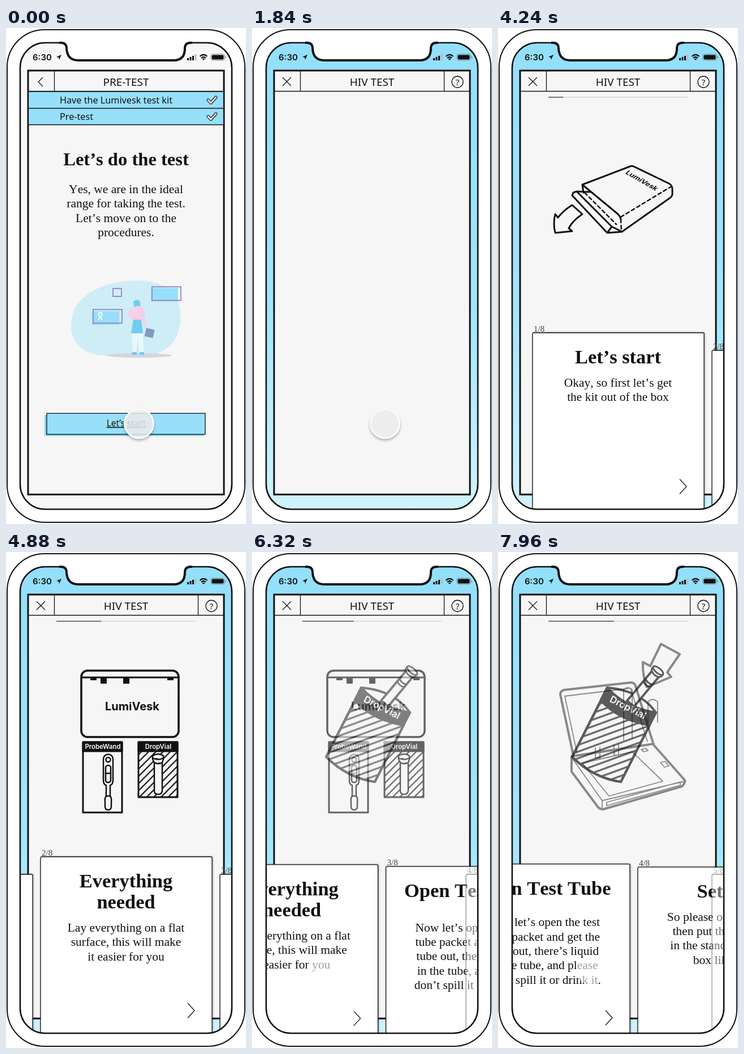
Write an HTML page that moves like this. It is 424 by 874 pixels and loops after 8 s.

```html
<!DOCTYPE html>
<html lang="en">
<head>
<meta charset="utf-8">
<title>Test guide</title>
<style>
  html, body { margin: 0; width: 100%; height: 100%; overflow: hidden; background: #fff; }
  svg { display: block; width: 100vw; height: 100vh; }
  text { fill: #111; }
  .title { font: bold 34.4px "Liberation Serif", serif; font-kerning: none; text-anchor: middle; }
  .home-title { font-size: 32.6px; }
  .body { font: 21.5px "Liberation Serif", serif; font-kerning: none; text-anchor: middle; }
  .count { font: 15px "Liberation Serif", serif; fill: #444; }
  .ui { font: 16.2px "Noto Sans", sans-serif; }
  .head { font-size: 18.9px; text-anchor: middle; }
  .brand { font: 700 20px Inter, sans-serif; text-anchor: middle; }
  .tag { font: 600 11.3px Inter, sans-serif; text-anchor: middle; fill: #fff; }
  .line { fill: none; stroke: #111; stroke-width: 1.3; }
  .art { fill: none; stroke: #111; stroke-width: 3; stroke-linejoin: round; stroke-linecap: round; }
  .bold { stroke-width: 4; }
  .art text { stroke: none; }
  .paper { fill: #f6f6f6; }
  .ink { fill: #111; }
</style>
</head>
<body>
<svg viewBox="0 0 424 874" preserveAspectRatio="none">
  <defs>
    <path id="screen" d="M25 70A44 44 0 0 1 69 26H97Q107 26 107 36Q108 57 128 57H296Q316 57 316 36Q316 26 326 26H355A44 44 0 0 1 399 70V804A44 44 0 0 1 355 848H69A44 44 0 0 1 25 804Z"/>
    <clipPath id="clip"><use href="#screen"/></clipPath>
    <linearGradient id="sky" x2="0" y2="1">
      <stop offset="0" stop-color="#92dffa"/>
      <stop offset=".55" stop-color="#a0e5fb"/>
      <stop offset="1" stop-color="#d3f4fd"/>
    </linearGradient>
    <pattern id="hatch" width="9" height="9" patternUnits="userSpaceOnUse" patternTransform="rotate(-45)">
      <path d="M0 4H9" stroke="#111" stroke-width="2.2"/>
    </pattern>
    <pattern id="stripes" width="11" height="11" patternUnits="userSpaceOnUse" patternTransform="rotate(-20)">
      <path d="M0 5H11" stroke="#111" stroke-width="3"/>
    </pattern>
    <filter id="shadow" x="-30%" y="-30%" width="160%" height="170%">
      <feDropShadow dx="0" dy="3" stdDeviation="2" flood-opacity=".3"/>
    </filter>
    <filter id="cardShadow" x="-5%" y="-5%" width="110%" height="110%">
      <feDropShadow dx="1" dy="0" stdDeviation="1.5" flood-opacity=".35"/>
    </filter>
    <g id="frame">
      <rect x="39" y="75" width="346" height="747" fill="#f6f6f6" stroke="#111" stroke-width="3"/>
      <path class="line" d="M40 111.5H384M85.5 76V111"/>
    </g>
  </defs>

  <rect x="2" y="3" width="420" height="868" rx="66" fill="#fff" stroke="#111" stroke-width="2"/>

  <g clip-path="url(#clip)">
    <rect width="424" height="874" fill="url(#sky)"/>
    <use href="#frame"/>
    <path class="line" d="M54 87L69 102M69 87L54 102M339.5 76V111"/>
    <text class="ui head" x="212" y="102">HIV TEST</text>
    <circle class="line" cx="363" cy="95" r="10"/>
    <text class="ui" x="363" y="100.5" text-anchor="middle" style="font-size:15px">?</text>

    <g id="progress">
      <path d="M89 122H335" stroke="#ddd" stroke-width="2"/>
      <path id="bar" stroke="#777" stroke-width="2"/>
    </g>

    <g id="arts">
      <g class="art">
        <path d="M151 290L149 276L233 244Q237 242 242 245L302 274Q308 277 308 284V292Q308 297 303 300L219 359L193 361L131 295L133 290L139 288L201 350L219 359M149 276L212 328Q216 332 217 337M139 288L164 289M201 350L193 361"/>
        <path d="M217 333L305 280M153 290L209 346M217 337L218 357" stroke-dasharray="6 5" stroke-width="2.5"/>
        <path d="M131 312L149 328Q131 340 125 353L131 358L101 361Q97 344 101 328L106 334Q116 321 131 312Z"/>
        <text class="brand" style="font-size:13px;text-anchor:start" transform="matrix(.87 .5 -.7 .6 224 256)">LumiVesk</text>
      </g>
      <g class="art">
        <rect x="133" y="209" width="172" height="117" rx="11" stroke-width="3.5"/>
        <path d="M133 221H305"/>
        <path class="ink" stroke="none" d="M149 221h11v5h-11zM167 221h11v11h-11zM207 221h11v11h-11zM285 221h11v5h-11z"/>
        <text class="brand" x="223" y="279">LumiVesk</text>
        <rect x="136" y="335" width="69" height="124"/>
        <path class="ink" d="M136 335h69v16h-69z"/>
        <text class="tag" x="171" y="347">ProbeWand</text>
        <g stroke-width="2.5">
          <path d="M172 365a8.5 8.5 0 0 1 17 0V402Q189 410 184 411V430Q187 434 186 440V449a5.5 5.5 0 0 1-11 0V440Q174 434 177 430V411Q172 410 172 402Z"/>
          <circle cx="180.5" cy="366" r="4"/>
          <rect x="176" y="376" width="9" height="30" rx="4"/>
          <path d="M176 390H185M177 430H184"/>
        </g>
        <rect x="234" y="335" width="69" height="97" fill="url(#hatch)"/>
        <path class="ink" d="M234 335h69v16h-69z"/>
        <text class="tag" x="269" y="347">DropVial</text>
        <path class="paper" stroke-width="2.5" d="M259 359Q269 353 278 359V365L276 371V421Q275 427 269 427Q262 427 262 421V371L259 365ZM259 363Q269 368 278 363M262 371Q269 375 276 371"/>
      </g>
      <g class="art bold">
        <path class="paper" d="M193 239Q252 244 279 283Q220 280 193 239Z"/>
        <g class="paper" transform="translate(283 209) rotate(40)">
          <path d="M-8 8V76H8V8Z"/>
          <path d="M-11 0V4Q-10 9 0 10Q10 9 11 4V0ZM-8 25Q0 30 8 25M-8 31Q0 36 8 31" stroke-width="3"/>
          <ellipse rx="11" ry="4.5" stroke-width="3"/>
        </g>
        <path class="paper" d="M193 239Q225 275 279 283L217 405Q168 398 131 361Z"/>
        <path fill="url(#stripes)" d="M182 262Q214 297 268 305L217 405Q168 398 131 361Z"/>
        <path class="ink" d="M193 239Q225 275 279 283L268 303Q214 297 182 260Z"/>
        <text class="tag" style="font-size:17px" transform="translate(227 279) rotate(27)">DropVial</text>
      </g>
      <g class="art bold">
        <path d="M133 358L110 251Q110 245 117 243L235 230Q241 230 243 236L275 340L330 402Q331 407 325 413L187 453Q181 454 177 450L130 387V360L275 338"/>
        <g stroke-width="1.8">
          <path d="M139 352L118 254L234 240L264 334M133 366L184 438L330 404M184 438V452M149 372L237 352L291 404L196 430ZM192 441V447L322 411V405ZM253 348l8-2 4 4-8 2zM287 371l8-2 7 8-8 2z"/>
          <path d="M222 331V242q7-6 15 0V328M265 310V264q8-8 17 0V300M172 345v18h8v-19M205 340v18h8v-19"/>
        </g>
        <path d="M288 162L321 180L299 212L306 220L263 238Q255 218 256 194L269 201Z"/>
      </g>
    </g>

    <g id="cards"></g>

    <g id="home">
      <rect width="424" height="874" fill="#f7f7f7"/>
      <use href="#frame"/>
      <path class="line" d="M65 87L57 95L65 103"/>
      <text class="ui head" x="212" y="102">PRE-TEST</text>
      <path fill="#97dffa" d="M40.5 112H383.5V171H40.5Z"/>
      <path class="line" d="M40 112H384M40 141.5H384M40 170.5H384"/>
      <text class="ui" x="95" y="133">Have the Lumivesk test kit</text>
      <text class="ui" x="95" y="162">Pre-test</text>
      <g fill="none" stroke-linecap="round" stroke-linejoin="round">
        <path d="M357 127L362 132L371 122M357 156L362 161L371 151" stroke="#111" stroke-width="5"/>
        <path d="M357 127L362 132L371 122M357 156L362 161L371 151" stroke="#fff" stroke-width="2.6"/>
      </g>
      <g id="intro"></g>

      <path fill="#cfedf6" d="M115 528C114 490 136 468 172 455C205 443 250 440 282 456C304 468 312 498 307 524C303 552 283 574 250 577H180C140 578 117 558 115 528Z"/>
      <ellipse cx="235" cy="577" rx="58" ry="4" fill="#d3d6df"/>
      <path fill="#97dffa" d="M256 458h48v24h-48zM152 499h48v24h-48z"/>
      <path fill="none" stroke="#988fcb" stroke-width="2" d="M189 459h15v14h-15zM258 456h51v24h-51zM154 496h51v24h-51z"/>
      <path fill="none" stroke="#fff" stroke-width="2" d="M163 514L169 506A3 3 0 1 0 164 506L170 514"/>
      <path fill="#e9f9fd" d="M222 536H242L243 571H236L233 545L230 571H224Z"/>
      <path fill="#70cdee" d="M225 482Q231 476 237 482L238 493L226 492ZM225 513H239L242 538H221ZM223 571H231V576H222ZM236 571H244V576H236Z"/>
      <path fill="#f4d0ea" d="M225 492Q235 487 243 492L246 512L250 530L246 531L240 514H224L213 505Z"/>
      <rect x="246" y="530" width="15" height="15" fill="#7f9cbc" transform="rotate(12 254 538)"/>

      <rect x="68" y="682" width="282" height="37" fill="#83d5f3"/>
      <rect x="72" y="679" width="280" height="37" fill="#98e0fa" stroke="#111" stroke-width="1.3"/>
      <text class="ui" x="212.5" y="702" text-anchor="middle" text-decoration="underline" style="font-size:15.4px">Let’s start</text>
    </g>

    <circle id="tap" cx="235" cy="697" r="25.5" fill="#f2f2f2" fill-opacity=".8" stroke="#fafafa" stroke-width="3" filter="url(#shadow)"/>
    <circle id="swipe" cy="737" r="26" fill="#fff"/>
  </g>

  <use href="#screen" fill="none" stroke="#111" stroke-width="2.6"/>
  <path d="M94 26H97Q107 26 107 36Q108 57 128 57H296Q316 57 316 36Q316 26 326 26H329" fill="none" stroke="#111" stroke-width="4"/>

  <text x="47" y="57" style="font:600 15px Inter,sans-serif">6:30</text>
  <path class="ink" d="M89 51L98 47L94 56L93 52Z"/>
  <path class="ink" d="M320 53h3v4h-3zM324.500 51h3v6h-3zM329 49h3v8h-3z"/>
  <path fill="#bbb" d="M333.500 46h3v11h-3z"/>
  <path fill="none" stroke="#111" stroke-width="2.2" d="M342.500 50Q349 44 355.500 50M345 53Q349 49.500 353 53"/>
  <path class="ink" d="M346.500 54.500Q349 53 351.500 54.500L349 57Z"/>
  <rect x="362" y="46" width="24" height="11" rx="3" fill="none" stroke="#888"/>
  <rect x="363.500" y="47.500" width="21" height="8" rx="2" class="ink"/>
  <path d="M388 50V53" stroke="#888" stroke-width="1.5"/>
</svg>

<script>
const LOOP = 8000;
const CARD_STEP = 317;
const SWIPE_MS = 500;
const swipes = [
  { start: 4250, touchX: 280 },
  { start: 6089, touchX: 264 },
  { start: 7740, touchX: 295 }
];
const barLengths = [26.3, 79, 105, 131];
// bodyDrop: how much lower the body text sits while the card is at the side.
const steps = [
  { title: ["Let’s start"], body: ["Okay, so first let’s get", "the kit out of the box"] },
  { title: ["Everything", "needed"], body: ["Lay everything on a flat", "surface, this will make", "it easier for you"] },
  { title: ["Open Test Tube"], bodyDrop: 36, body: ["Now let’s open the test", "tube packet and get the", "tube out, there’s liquid", "in the tube, and please", "don’t spill it or drink it."] },
  { title: ["Set up"], body: ["So please open the box", "then put the test tube", "in the stand inside the", "box like this"] },
  { title: ["Wait"], body: ["Leave the tube there"] }
];

const $ = id => document.getElementById(id);
const clamp = (v, lo = 0, hi = 1) => Math.min(hi, Math.max(lo, v));
const ramp = (t, start, length) => clamp((t - start) / length);
const ease = p => p * p * (3 - 2 * p);

const textLines = (lines, cls, x, y, gap) => lines.map((line, i) =>
  `<text class="${cls}" x="${x}" y="${y + i * gap}">${line}</text>`).join("");

$("intro").innerHTML = textLines(["Let’s do the test"], "title home-title", 212, 242, 0) +
  textLines(["Yes, we are in the ideal", "range for taking the test.", "Let’s move on to the", "procedures."], "body", 212, 291, 25.4);

// Each card is drawn with its top left corner at the origin.
$("cards").innerHTML = steps.map(({ title, body }, i) => `<g>
  <text class="count" x="2" y="-2">${i + 1}/8</text>
  <rect width="303" height="360" rx="2" fill="#fff" stroke="#111" stroke-width="1.3" filter="url(#cardShadow)"/>
  ${textLines(title, "title", 151, 54, 37)}
  <g class="copy">${textLines(body, "body", 151, 57 + title.length * 37.5, 25.4)}</g>
  <path class="line" d="M260 258L272 271L260 284"/>
</g>`).join("");

const cards = [...$("cards").children];
const copies = cards.map(card => card.querySelector(".copy"));
const arts = [...$("arts").children];

function draw(t) {
  $("home").style.opacity = 1 - ramp(t, 1000, 500);
  $("tap").style.opacity = 1 - ramp(t, 3300, 200);

  const position = swipes.reduce((sum, s) => sum + ease(ramp(t, s.start, SWIPE_MS)), 0);
  const index = Math.floor(position);
  const part = position - index;
  const introShift = 340 * (1 - ease(ramp(t, 2754, 580)));
  const reveal = ramp(t, 2200, 400);

  cards.forEach((card, i) => {
    const offset = i - position;
    const place = clamp(offset, -1, 1);
    const side = Math.abs(place);
    card.setAttribute("transform",
      `translate(${61 + CARD_STEP * place + introShift} ${537 + 31 * side})`);
    card.style.opacity = clamp(2 - Math.abs(offset));
    copies[i].setAttribute("transform", `translate(0 ${(steps[i].bodyDrop || 0) * side})`);
  });

  arts.forEach((art, i) => {
    art.style.opacity = reveal * clamp(1.15 * (1 - Math.abs(i - position)));
  });

  const from = barLengths[index];
  const to = barLengths[Math.min(index + 1, 3)];
  $("progress").style.opacity = reveal;
  $("bar").setAttribute("d", `M89 122h${from + (to - from) * part}`);

  const active = swipes.find(s => t > s.start - 200 && t < s.start + SWIPE_MS);
  $("swipe").style.opacity = active
    ? 0.6 * ramp(t, active.start - 200, 200) * (1 - ramp(t, active.start + 300, 200)) : 0;
  if (active) {
    $("swipe").setAttribute("cx", active.touchX - CARD_STEP * ease(ramp(t, active.start, SWIPE_MS)));
  }
}

function tick() {
  draw(performance.now() % LOOP);
  requestAnimationFrame(tick);
}
tick();
</script>
</body>
</html>
```
